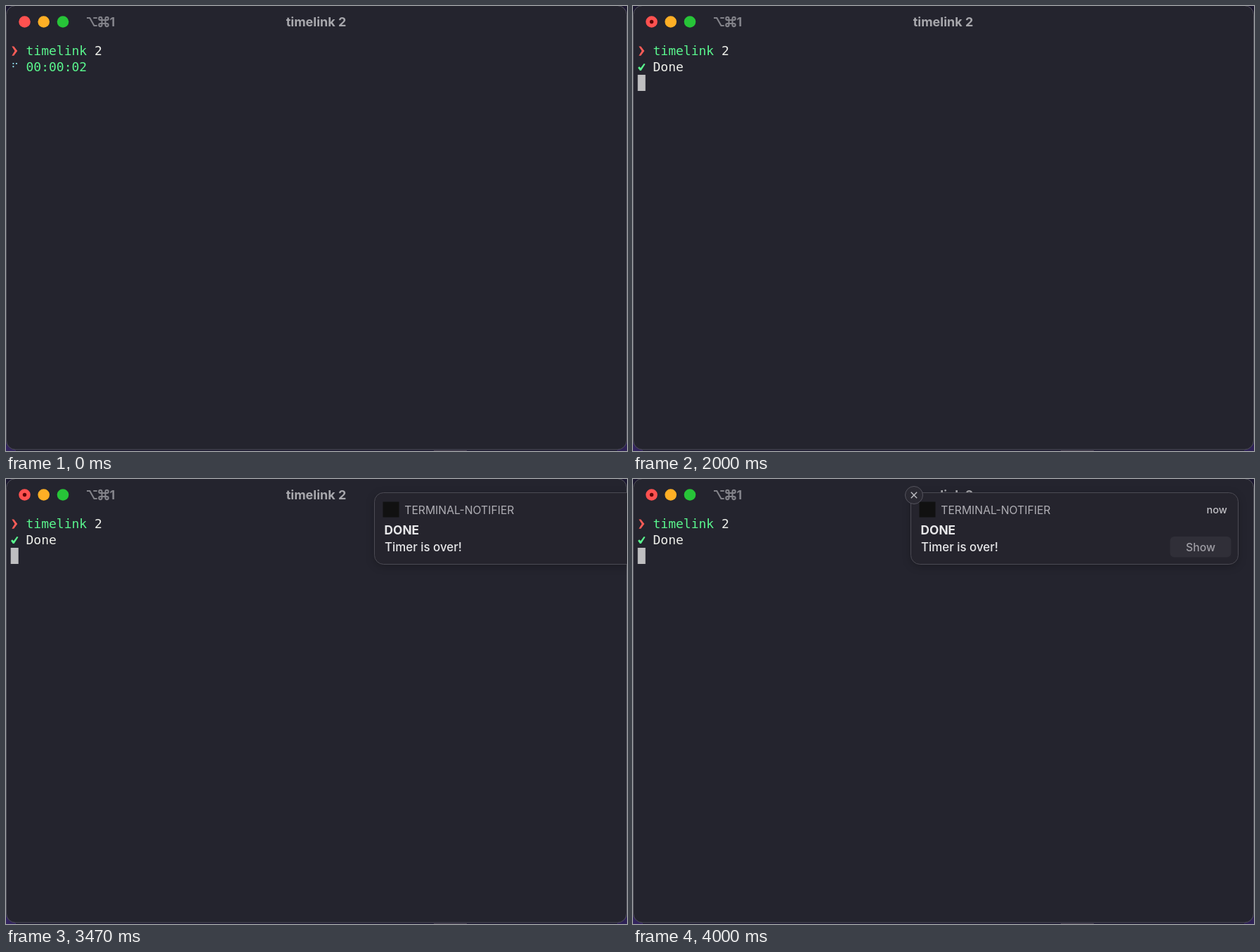
Animation, 884 px wide and 634 px high, one loop 4560 ms. Source, as an HTML page:

```html
<!DOCTYPE html>
<html lang="en">
<head>
<meta charset="utf-8">
<title>timelink 2</title>
<style>
  html, body { margin: 0; width: 100%; height: 100%; overflow: hidden; background: #1b1730; }
  svg { display: block; }
  text { font-family: Inter, "Open Sans", sans-serif; white-space: pre; }
  .mono { font: 18px "DejaVu Sans Mono", monospace; fill: #eff0eb; }
  .green { fill: #5af78e; }
  .title { font-size: 18px; font-weight: 700; }
  .card { filter: drop-shadow(0 3px 6px rgba(0, 0, 0, .22)); }
</style>
</head>
<body>
<svg width="884" height="634" viewBox="0 0 884 634">
  <!-- desktop behind the window -->
  <path d="M0 610h14v24H0z" fill="#33245e"/>
  <path d="M870 610h14v24h-14z" fill="#2e2156"/>
  <path d="M609 633h47v1h-47z" fill="#47404f"/>

  <rect x=".5" y="-.5" width="883" height="632.5" rx="13" fill="#24242e" stroke="#50505a"/>
  <circle cx="26.5" cy="22.5" r="8.3" fill="#ff5150"/>
  <circle id="busy" cx="26.5" cy="22.5" r="2.7" fill="#5e0506"/>
  <circle cx="53.7" cy="22.5" r="8.3" fill="#ffaf25"/>
  <circle cx="81" cy="22.5" r="8.3" fill="#27c438"/>
  <g fill="none" stroke="#83838a" stroke-width="2.1">
    <path d="M115 17h4.3l6.2 11h4.2M124.3 17h5.4"/>
    <path d="M136.5 20h-2.1a2.1 2.1 0 1 1 2.1-2.1v9.2a2.1 2.1 0 1 1-2.1-2.1h9.2a2.1 2.1 0 1 1-2.1 2.1v-9.2a2.1 2.1 0 1 1 2.1 2.1z"/>
  </g>
  <text class="title" x="147.5" y="29" fill="#83838a">1</text>
  <text class="title" x="441.5" y="29" fill="#a7a7ac" text-anchor="middle">timelink 2</text>

  <path d="M8.3 57.5h2.9l5 6.6-5 6.6H8.3l4.2-6.6z" fill="#ff5c57"/>
  <text class="mono" x="28.5" y="70"><tspan class="green">timelink</tspan> 2</text>

  <g id="running">
    <g id="spinner" fill="#9aedfe"></g>
    <text class="mono green" id="clock" x="28.5" y="93"></text>
  </g>
  <g id="done">
    <path class="green" d="M7 88l2-1.8 1.9 2.1 4.6-6.2 2 .7-5.9 9.2H9.8z"/>
    <text class="mono" x="28.5" y="93">Done</text>
    <rect x="6.7" y="98" width="11" height="23" fill="#bfbfc1"/>
  </g>

  <!-- notification, laid out from its own left edge -->
  <g id="note">
    <rect class="card" x=".5" y="19.5" width="466" height="102" rx="13" fill="#25242d" stroke="#4c4b54"/>
    <rect x="12.5" y="32.5" width="23" height="22" fill="#111"/>
    <text x="43.3" y="49.7" font-size="15.7" fill="#afaeb4">TERMINAL-NOTIFIER</text>
    <text x="450.7" y="49" font-size="14.5" font-weight="500" fill="#c2c1c6" text-anchor="end">now</text>
    <text x="14.6" y="79" font-size="17.3" font-weight="650" fill="#e8e8ea">DONE</text>
    <text x="15" y="103" font-size="16.9" font-weight="450" fill="#e8e8ea">Timer is over!</text>
    <g id="hover">
      <rect x="369.5" y="82" width="87" height="29.5" rx="6" fill="#302f38"/>
      <text x="413" y="102.5" font-size="15.7" font-weight="500" fill="#9f9ea5" text-anchor="middle">Show</text>
      <circle cx="5" cy="23" r="12.5" fill="#2a2932" stroke="#55545e"/>
      <path d="M.8 18.8l8.4 8.4m0-8.4l-8.4 8.4" stroke="#bdbdc2" stroke-width="1.4"/>
    </g>
  </g>
</svg>
<script>
const LOOP = 4560, SECOND = 1000, FINISH = 2000;
const NOTE = { start: 3335, time: 306, from: 884, to: 395 };
const HOVER = { start: 3850, time: 150 };
const $ = id => document.getElementById(id);
const show = (id, on) => $(id).setAttribute('visibility', on ? 'visible' : 'hidden');
const progress = (t, { start, time }) => Math.min(1, Math.max(0, (t - start) / time));

// cubic-bezier(.25, .1, .25, 1)
function ease(x) {
  const curve = (u, a, b) => 3 * a * u * (1 - u) ** 2 + 3 * b * u * u * (1 - u) + u ** 3;
  let lo = 0, hi = 1;
  for (let i = 0; i < 24; i++) {
    const mid = (lo + hi) / 2;
    if (curve(mid, .25, .25) < x) lo = mid; else hi = mid;
  }
  return curve(hi, .1, 1);
}

// Braille dots: bits 0-2 are the left column, bits 3-5 the right one
const glyphs = '⠋⠙⠹⠸⠼⠴⠦⠧⠇⠏';
const dots = Array.from({ length: 6 }, (_, i) => {
  const dot = document.createElementNS('http://www.w3.org/2000/svg', 'circle');
  dot.setAttribute('cx', i < 3 ? 10.4 : 14.9);
  dot.setAttribute('cy', 82 + i % 3 * 4.3);
  dot.setAttribute('r', 1.1);
  return $('spinner').appendChild(dot);
});

function draw(t) {
  const running = t < FINISH;
  show('running', running);
  show('done', !running);
  show('busy', t >= 600);

  const step = Math.max(0, Math.floor((t - 30) / 86.6) + 1);
  const bits = glyphs.charCodeAt(step % glyphs.length) - 0x2800;
  dots.forEach((dot, i) => dot.setAttribute('opacity', bits >> i & 1));
  $('clock').textContent = '00:00:0' + (t < SECOND ? 2 : 1);

  const x = NOTE.from + (NOTE.to - NOTE.from) * ease(progress(t, NOTE));
  show('note', t >= NOTE.start);
  $('note').setAttribute('transform', `translate(${Math.round(x)})`);
  $('hover').setAttribute('opacity', progress(t, HOVER));
}

let origin;
function tick(now) {
  origin ??= now;
  draw((now - origin) % LOOP);
  requestAnimationFrame(tick);
}
draw(0);
requestAnimationFrame(tick);
</script>
</body>
</html>
```
